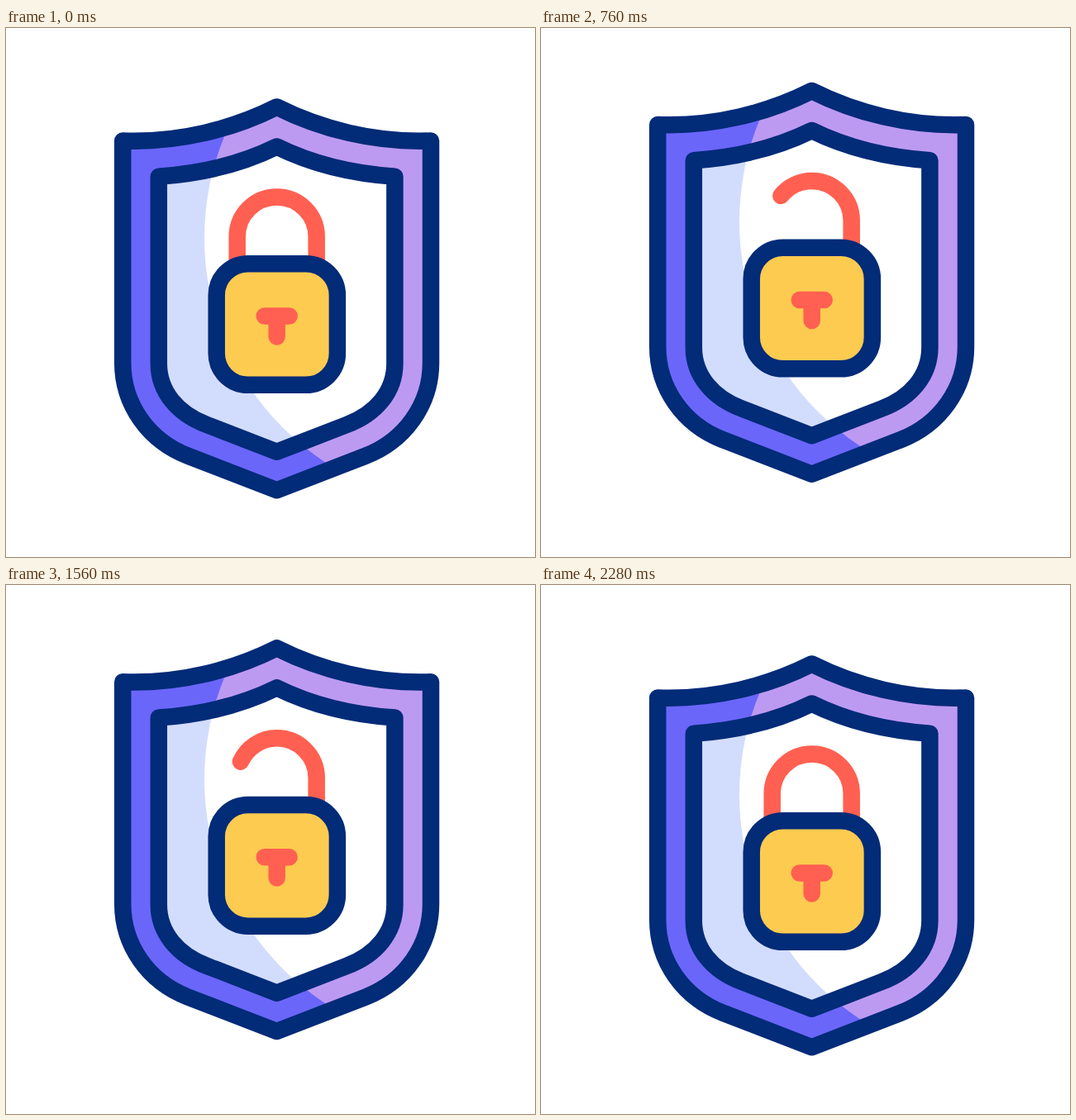
Recreate the animation shown at these times as an HTML page. Size 640 by 640 pixels, loop 2320 ms.

```html
<!DOCTYPE html>
<html lang="en">
<head>
<meta charset="utf-8">
<title>Shield and padlock</title>
<style>
  html, body { margin: 0; width: 100%; height: 100%; overflow: hidden; background: #fff; }
  svg { display: block; width: 100vw; height: 100vh; }
  .line { fill: none; stroke: #022b78; stroke-width: 20.5; stroke-linejoin: round; }
  .red { fill: none; stroke: #ff6051; stroke-width: 20.5; stroke-linecap: round; stroke-linejoin: round; }
</style>
</head>
<body>
<svg viewBox="0 0 640 640">
  <defs>
    <path id="rim" d="M141.2 136.5C210 139 275 122 327.6 95.5C380.2 122 445.2 139 514 136.5V405C514 455 483 499 435.2 517.6L327.6 559.2L220 517.6C172 499 141.2 455 141.2 405Z"/>
    <path id="panel" d="M184.8 179.7C240 176 290 162 327.6 143.5C365.2 162 415.2 176 470.4 179.7V406C470.4 440 447.2 467 412.2 480L327.6 512.8L243 480C208 467 184.8 440 184.8 406Z"/>
    <clipPath id="rimClip"><use href="#rim"/></clipPath>
    <clipPath id="panelClip"><use href="#panel"/></clipPath>
  </defs>
  <g id="shield">
    <g clip-path="url(#rimClip)">
      <rect width="640" height="640" fill="#6a66fa"/>
      <circle cx="565" cy="254" r="325" fill="#bd9af2"/>
    </g>
    <g clip-path="url(#panelClip)">
      <rect width="640" height="640" fill="#d2ddfe"/>
      <circle cx="565" cy="254" r="325" fill="#fff"/>
    </g>
    <use href="#rim" class="line"/>
    <use href="#panel" class="line"/>
    <g id="lock">
      <path id="shackle" class="red" d="M279.7 285V252.5A48 48 0 0 1 375.7 252.5V285"/>
      <rect x="254.7" y="285.2" width="146.2" height="146.6" rx="38" fill="#fdcb50"/>
      <rect x="254.7" y="285.2" width="146.2" height="146.6" rx="38" class="line"/>
      <path class="red" d="M312.7 348.4H342.7M327.7 348.4V373.6"/>
    </g>
  </g>
</svg>
<script>
  const LOOP = 2320, STEP = 40, OPEN = 65;
  const [shield, lock, shackle] = ['shield', 'lock', 'shackle'].map(id => document.getElementById(id));
  const length = shackle.getTotalLength();

  // [time in ms, height above rest]
  const rise = [
    [0, 0], [80, 0], [320, 2.5], [600, 13], [760, 19.5], [1080, 26.6], [1200, 27.4],
    [1400, 25], [1720, 12.6], [2000, 2.5], [2240, 0], [2320, 0]
  ];

  function smooth(t, from, to) {
    const s = Math.min(1, Math.max(0, (t - from) / (to - from)));
    return s * s * (3 - 2 * s);
  }

  // Slope at a key; flat at peaks and rests.
  function slope(keys, i) {
    const a = keys[i - 1], b = keys[i], c = keys[i + 1];
    if (!a || !c || (b[1] - a[1]) * (c[1] - b[1]) <= 0) return 0;
    return (c[1] - a[1]) / (c[0] - a[0]);
  }

  function curve(keys, t) {
    let i = 0;
    while (i < keys.length - 2 && t >= keys[i + 1][0]) i++;
    const [t0, v0] = keys[i], [t1, v1] = keys[i + 1];
    const d = t1 - t0, s = (t - t0) / d, r = 1 - s;
    return v0 * r * r * (1 + 2 * s) + v1 * s * s * (3 - 2 * s)
      + d * s * r * (slope(keys, i) * r - slope(keys, i + 1) * s);
  }

  function draw(now) {
    let t = Math.floor((now % LOOP) / STEP) * STEP;
    if (t < 2 * STEP) t = 0;
    const open = OPEN * (smooth(t, 60, 508) - smooth(t, 1420, 1925));
    const tilt = -0.5 * (smooth(t, 160, 320) - smooth(t, 320, 480));
    shield.setAttribute('transform', `translate(0 ${-curve(rise, t)})`);
    lock.setAttribute('transform', `rotate(${tilt} 327.7 358.5)`);
    shackle.setAttribute('stroke-dasharray', `${length} ${length}`);
    shackle.setAttribute('stroke-dashoffset', -open);
  }

  const start = performance.now();
  function tick() {
    draw(performance.now() - start);
    requestAnimationFrame(tick);
  }
  tick();
</script>
</body>
</html>
```
